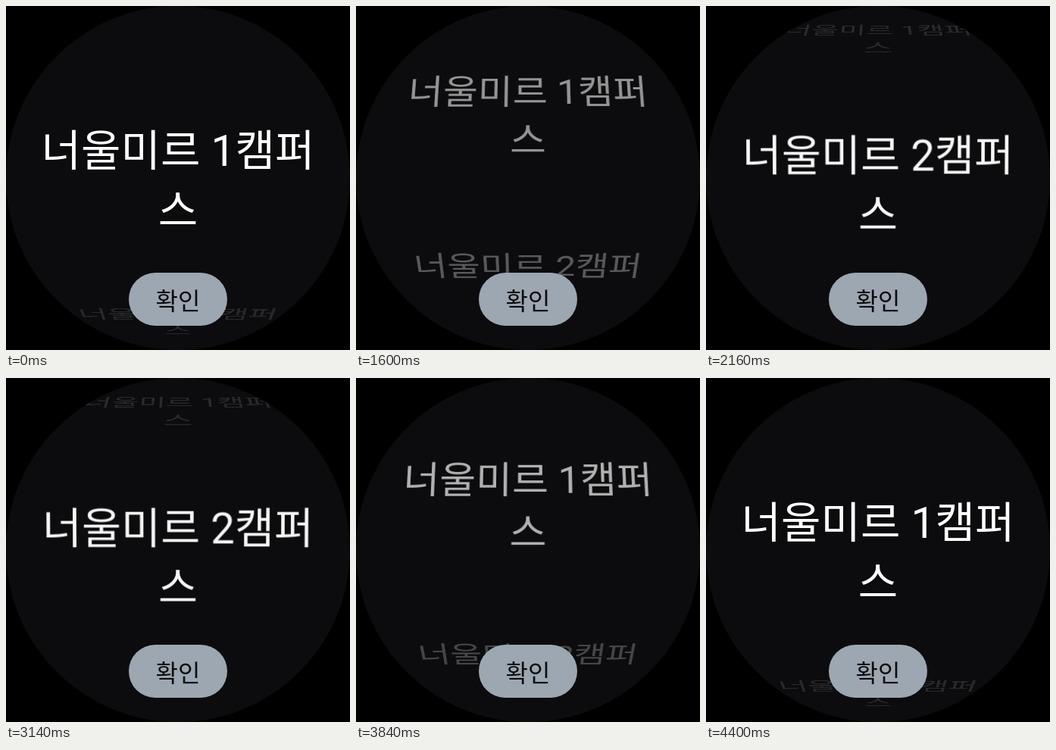
These frames come from a looping animation (454 px wide and 454 px high, 4.42 s). An HTML page:

```html
<!DOCTYPE html>
<html lang="ko">
<head>
<meta charset="utf-8">
<title>Campus picker</title>
<style>
  html, body { margin: 0; width: 100%; height: 100%; overflow: hidden; background: #000; }
  .watch {
    position: absolute; left: 0; top: 0; width: 454px; height: 454px;
    border-radius: 50%; overflow: hidden; background: #0c0c0e;
  }
  .item {
    position: absolute; left: 0; top: -79px; width: 454px; height: 158px;
    padding-top: 2px; box-sizing: border-box; color: #fff;
    transform-origin: 50% 50%; text-align: center; white-space: nowrap;
    font: 400 57px/79px Roboto, "Noto Sans CJK KR", "Noto Sans CJK", sans-serif;
  }
  .ok {
    position: absolute; left: 162px; top: 352px; width: 130px; height: 70px;
    border-radius: 35px; background: #9ca7b2; color: #0c0c0e; text-align: center;
    font: 400 32px/70px "Noto Sans CJK KR", "Noto Sans CJK", sans-serif;
  }
</style>
</head>
<body>
<div class="watch">
  <div class="item">너울미르 1캠퍼<br>스</div>
  <div class="item">너울미르 2캠퍼<br>스</div>
  <div class="ok">확인</div>
</div>
<script>
const LOOP = 4420, START = 1320;
const CENTER = 229, RADIUS = 205, TILT = 67;
const REST = 0.975, NEAR = 0.08;
const items = [...document.querySelectorAll('.item')];

// Three steps per 140 ms, held for 100, 20 and 20 ms
function stepAt(t) {
  if (t < START) return -3;
  const rest = (t - START) % 140;
  return 3 * Math.floor((t - START) / 140) + (rest >= 120 ? 2 : rest >= 100 ? 1 : 0);
}

function smooth(n, from, to) {
  const u = Math.min(1, Math.max(0, (n - from) / (to - from)));
  return u * u * (3 - 2 * u);
}

// Swipe to the second item, swipe back, then snap to the first
function wheelAt(n) {
  return REST * smooth(n, -2.9, 18.4)
    - (REST - NEAR) * smooth(n, 38, 60.5)
    - NEAR * smooth(n, 60.5, 66);
}

function place(el, x) {
  const far = Math.abs(x);
  const y = CENTER + RADIUS * Math.sin(x * TILT * Math.PI / 180);
  el.style.transform =
    `translateY(${y}px) perspective(1000px) scale(${1 - 0.3 * far}) rotateX(${-TILT * x}deg)`;
  el.style.opacity = 0.12 + 0.88 * Math.pow(Math.max(0, 1 - far), 1.5);
}

function draw(now) {
  const pos = wheelAt(stepAt(now % LOOP));
  items.forEach((el, i) => place(el, i - pos));
}

const begin = performance.now();
function tick() {
  draw(performance.now() - begin);
  requestAnimationFrame(tick);
}
draw(0);
requestAnimationFrame(tick);
</script>
</body>
</html>
```
